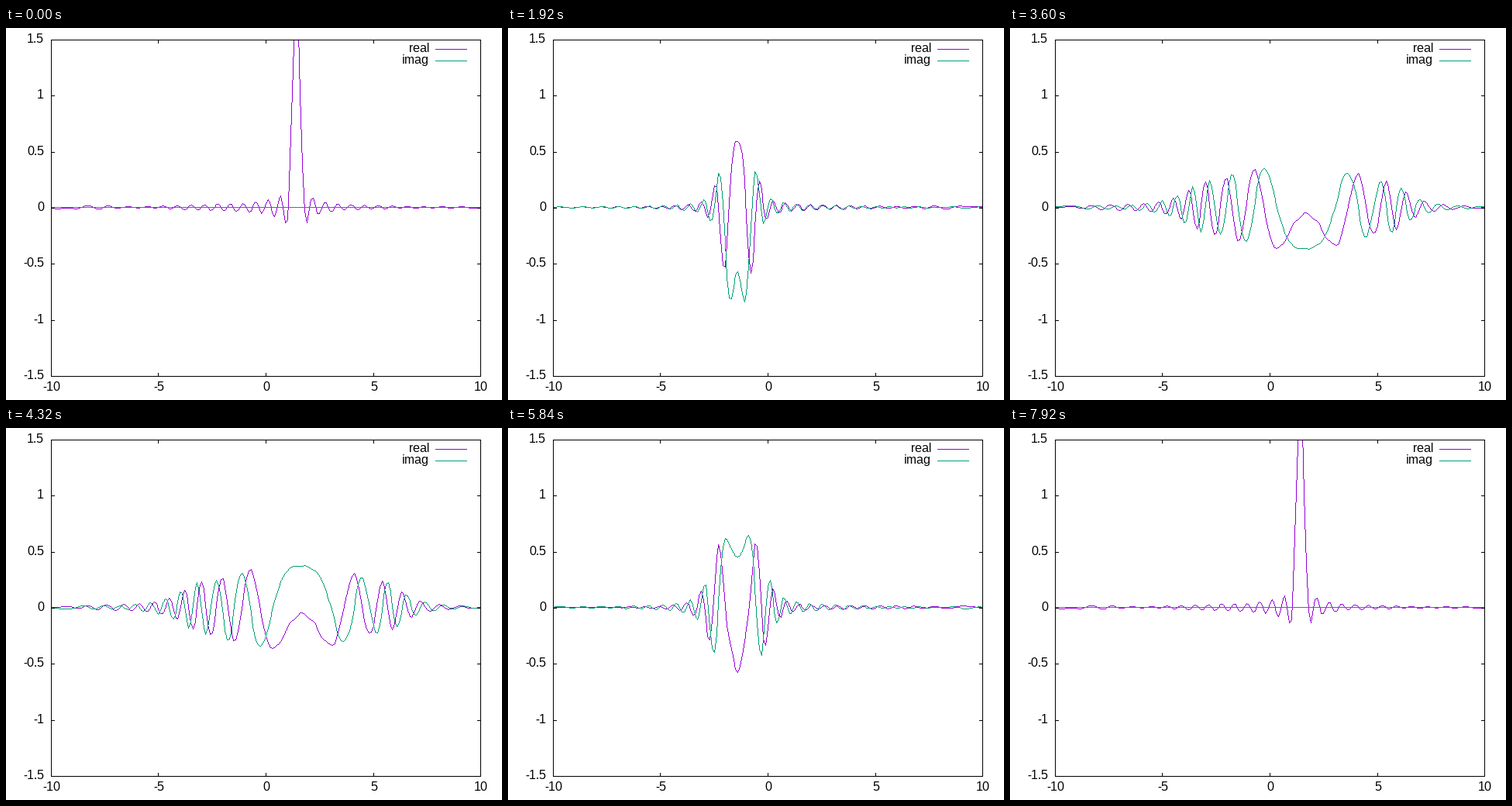
Recreate the animation shown at these times as a matplotlib script. Size 640 px wide and 480 px high, loop 8000 ms.

```python
import numpy as np
import matplotlib
import matplotlib.pyplot as plt
from matplotlib.animation import FuncAnimation

W, H, DPI = 640, 480, 80
PX = 72 / DPI                      # one pixel in points
LEFT, RIGHT, TOP, BOTTOM = 58, 612, 15, 449
FRAMES, INTERVAL = 100, 80
LEVELS = 60                        # oscillator states kept in every sum
SQUEEZE = 2.0
CENTRE = np.sqrt(2)
PURPLE, GREEN = "#9400d3", "#009e73"

matplotlib.rcParams.update({
    "font.family": "Liberation Sans",
    "text.hinting": "default",
    "text.hinting_factor": 1,
})


def oscillator_states(x):
    """Normalised harmonic oscillator eigenfunctions, one per row."""
    phi = np.zeros((LEVELS, x.size))
    phi[0] = np.pi ** -0.25 * np.exp(-x ** 2 / 2)
    phi[1] = np.sqrt(2) * x * phi[0]
    for n in range(1, LEVELS - 1):
        phi[n + 1] = (np.sqrt(2 / (n + 1)) * x * phi[n]
                      - np.sqrt(n / (n + 1)) * phi[n - 1])
    return phi


def squeezed_coefficients():
    """Truncated squeezed vacuum, displaced and then truncated again."""
    x, dx = np.linspace(-18, 18, 7201, retstep=True)
    width = np.exp(-SQUEEZE)
    packet = np.exp(-(x / width) ** 2 / 2) / (np.pi ** 0.25 * np.sqrt(width))
    states = oscillator_states(x)
    vacuum = states @ packet * dx
    displaced = vacuum @ oscillator_states(x - CENTRE)
    return states @ displaced * dx


def to_px(x):
    return np.round(LEFT + (x + 10) * (RIGHT - LEFT) / 20)


def to_py(y):
    return np.round(BOTTOM - (y + 1.5) * (BOTTOM - TOP) / 3)


def raster(px, py):
    """Pixels of a one-pixel polyline, kept inside the plot border."""
    steps = np.maximum(np.abs(np.diff(px)), np.abs(np.diff(py)))
    ends = np.concatenate([[0], np.cumsum(steps)])
    k = np.arange(ends[-1] + 1)
    x, y = (np.round(np.interp(k, ends, p)) for p in (px, py))
    inside = (x > LEFT) & (x < RIGHT) & (y > TOP) & (y < BOTTOM)
    return x[inside], y[inside]


xs = np.linspace(-10, 10, 201)
terms = squeezed_coefficients()[:, None] * oscillator_states(xs)
energy = np.arange(LEVELS) + 0.5

fig = plt.figure(figsize=(W / DPI, H / DPI), dpi=DPI, facecolor="white")
ax = fig.add_axes([0, 0, 1, 1])
ax.set_xlim(0, W)
ax.set_ylim(H, 0)
ax.axis("off")


def stroke(x, y, color="black"):
    # Snapping moves whole coordinates onto pixel centres.
    ax.plot(x, y, color=color, lw=PX, snap=True, zorder=5,
            solid_capstyle="projecting", solid_joinstyle="miter")


def label(x, y, text, align):
    ax.text(x, y, text, fontsize=16 * PX, ha=align, va="baseline")


def draw_border_and_ticks():
    stroke([LEFT, RIGHT, RIGHT, LEFT, LEFT], [TOP, TOP, BOTTOM, BOTTOM, TOP])
    for v in (-10, -5, 0, 5, 10):
        x = to_px(v)
        stroke([x, x], [BOTTOM, BOTTOM - 4])
        stroke([x, x], [TOP, TOP + 4])
        label(x + 1, 468, f"{v}", "center")
    for v in np.arange(-1.5, 1.6, 0.5):
        y = to_py(v)
        stroke([LEFT, LEFT + 4], [y, y])
        stroke([RIGHT, RIGHT - 4], [y, y])
        label(49, y + 4, f"{v:g}", "right")


def draw_key():
    for text, color, y in (("real", PURPLE, 27), ("imag", GREEN, 42)):
        label(546, y + 4, text, "right")
        stroke([554, 594], [y, y], color)


draw_border_and_ticks()
draw_key()
curves = [ax.plot([], [], ",", color=color, zorder=z)[0]
          for color, z in ((PURPLE, 2), (GREEN, 3))]


def update(i):
    t = 4 * np.pi * i / (FRAMES - 1)
    psi = np.exp(-1j * energy * t) @ terms
    for curve, part in zip(curves, (psi.real, psi.imag)):
        curve.set_data(*raster(to_px(xs), to_py(part)))
    return curves


anim = FuncAnimation(fig, update, frames=FRAMES, interval=INTERVAL,
                     repeat=True, repeat_delay=0)
plt.show()
```
